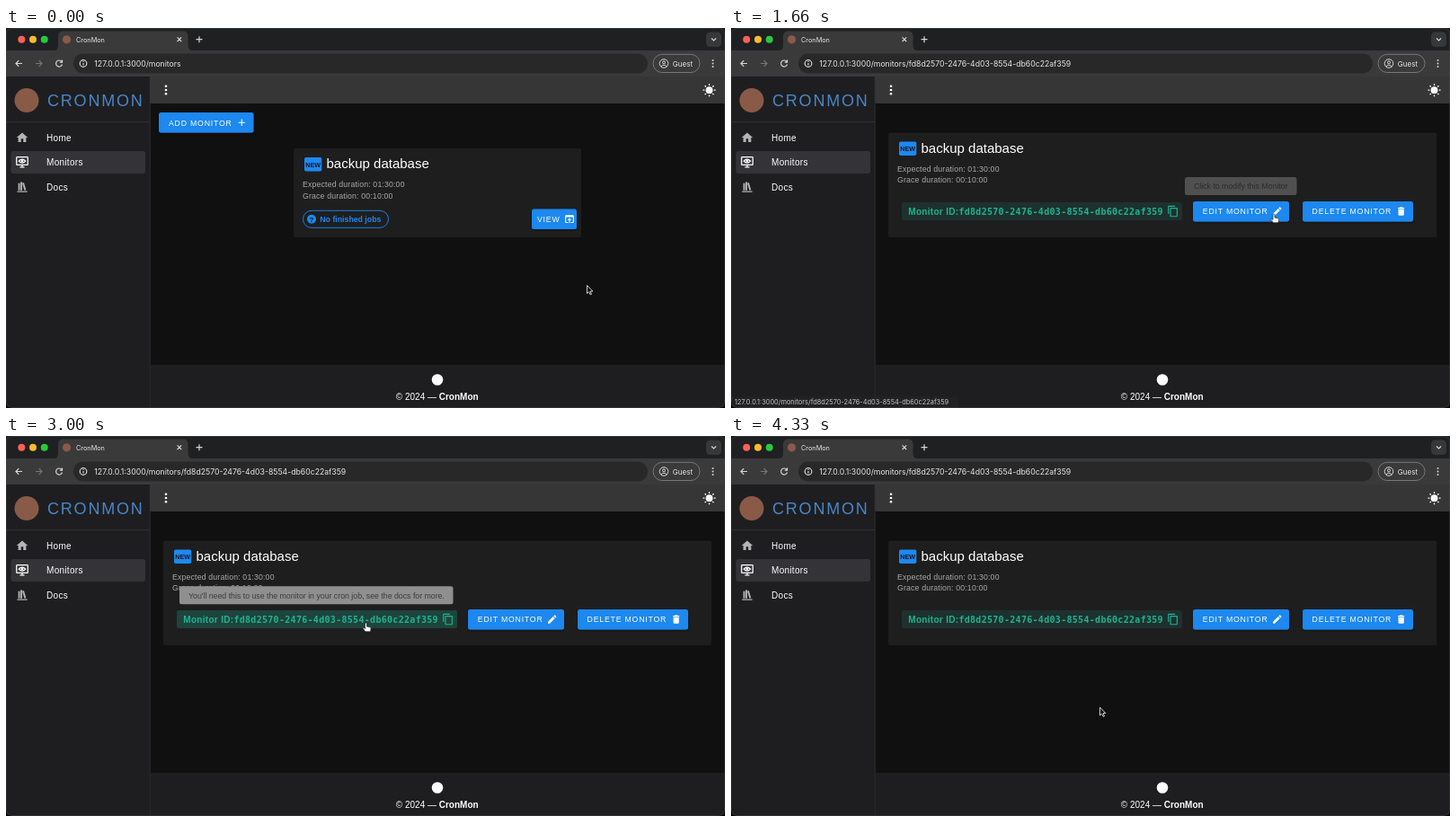
Write an HTML page that moves like this. It is 800 px wide and 423 px high and loops after 4.41 s.

```html
<!DOCTYPE html>
<html lang="en">
<head>
<meta charset="utf-8">
<title>CronMon</title>
<style>
html, body { margin: 0; width: 100%; height: 100%; overflow: hidden; background: #101010; }
svg { display: block; width: 100vw; height: 100vh; }
text { font-family: "Liberation Sans", Arial, sans-serif; fill: #fff; white-space: pre; }
.ui { font-family: Inter, sans-serif; fill: #e6e6e6; }
.nav { font-size: 10px; letter-spacing: .3px; }
.title { font-size: 15px; }
.sub { font-size: 8.75px; letter-spacing: .156px; fill: #a9a9a9; }
.btn { font-size: 8.75px; letter-spacing: .78px; }
.tip { font-size: 8.75px; fill: #3c3c3c; }
.id { font-size: 10px; font-weight: bold; letter-spacing: .3px; fill: #1fb394; }
.mono { font-family: "DejaVu Sans Mono", monospace; }
.line { fill: none; stroke: #d6d6d6; stroke-width: 1.2; }
.blue { fill: #1e88f0; }
.white { fill: #fff; }
</style>
</head>
<body>
<svg viewBox="0 0 800 423" preserveAspectRatio="none">
  <defs>
    <clipPath id="viewClip"><rect x="585" y="201.5" width="50" height="22.5" rx="2.5"/></clipPath>
    <filter id="shade" x="-10%" y="-20%" width="120%" height="160%">
      <feDropShadow dx="0" dy="1" stdDeviation="1" flood-opacity=".5"/>
    </filter>
  </defs>

  <!-- browser frame -->
  <rect width="800" height="423" fill="#101010"/>
  <rect width="800" height="26" fill="#1f2022"/>
  <path d="M52 25.5Q58 25.5 58 19V9Q58 3.5 64 3.5H197Q202.500 3.500 202.500 9V19Q202.500 25.500 208.500 25.500Z" fill="#3a3a3b"/>
  <rect y="25" width="800" height="29" fill="#3a3a3b"/>
  <circle cx="17.300" cy="12.800" r="4" fill="#ff5f57"/>
  <circle cx="30" cy="12.800" r="4" fill="#febc2e"/>
  <circle cx="42.700" cy="12.800" r="4" fill="#28c840"/>
  <circle cx="67.500" cy="12.800" r="4.600" fill="#8a5a48"/>
  <text class="ui" x="78" y="15.500" font-size="7.300">CronMon</text>
  <path class="line" d="M190.600 10.400l4.600 4.600m0-4.600l-4.600 4.600M211.500 12.700h7m-3.500-3.500v7"/>
  <rect x="779" y="4.500" width="17" height="16.500" rx="4.500" fill="#37383a"/>
  <path class="line" d="M785 11.500l2.500 2.500 2.500-2.500"/>
  <path class="line" d="M18 39.500H11m3.300-3.300L11 39.500l3.300 3.300"/>
  <path class="line" style="stroke:#767676" d="M33 39.500h7m-3.300-3.300l3.300 3.300-3.300 3.300"/>
  <path class="line" d="M62 37.500A3.500 3.500 0 1 0 62.500 40.500M62.500 35.500V38.200H59.800"/>
  <rect x="75" y="28.500" width="639" height="22" rx="11" fill="#282829"/>
  <circle class="line" cx="86" cy="39.500" r="3.800" stroke-width="1"/>
  <path class="line" d="M86 38.900v2.700m0-4.500v1"/>
  <text class="ui" id="url" x="98.300" y="42.700" font-size="8.700"></text>
  <rect class="line" x="720" y="29.300" width="52" height="20.200" rx="10.100" style="stroke:#777;stroke-width:1"/>
  <circle class="line" cx="732" cy="39.500" r="4.800" style="stroke-width:1"/>
  <circle class="line" cx="732" cy="38.300" r="1.500" style="stroke-width:1"/>
  <path class="line" d="M728.800 42.800Q732 39.600 735.200 42.800" style="stroke-width:1"/>
  <text class="ui" x="741.800" y="42.500" font-size="8">Guest</text>
  <g fill="#d6d6d6"><circle cx="786.500" cy="36" r="1"/><circle cx="786.500" cy="39.500" r="1"/><circle cx="786.500" cy="43" r="1"/></g>

  <!-- app shell -->
  <rect x="160" y="54" width="640" height="30" fill="#363637"/>
  <rect y="54" width="160" height="369" fill="#1e1e20"/>
  <path d="M160.300 54V423M0 104.500H160" stroke="#353537" stroke-width=".8"/>
  <rect x="161" y="375" width="639" height="48" fill="#1e1e20"/>
  <circle cx="23" cy="80.500" r="13.500" fill="#8a5a48"/>
  <text x="46" y="86.800" font-size="18" style="fill:#4a86c8;letter-spacing:1.8px">CRONMON</text>
  <g class="white"><circle cx="178" cy="64.800" r="1.300"/><circle cx="178" cy="69" r="1.300"/><circle cx="178" cy="73.200" r="1.300"/></g>
  <circle class="white" cx="782.500" cy="69.200" r="3.900"/>
  <path id="rays" stroke="#fff" stroke-width="1.300"/>
  <rect x="5.500" y="137" width="149.500" height="25" rx="2.500" fill="#343337"/>
  <g fill="#b4b4b5">
    <path transform="translate(10.500 114.500) scale(.625)" d="M10,20V14H14V20H19V12H22L12,3L2,12H5V20H10Z"/>
    <path transform="translate(10.500 169.500) scale(.625)" d="M9 3V18H12V3H9M12 5L16 18L19 17L15 4L12 5M5 5V18H8V5H5M3 19V21H21V19H3Z"/>
  </g>
  <g transform="translate(10.500 141.800) scale(.625)" fill="none" stroke="#fff" stroke-width="2">
    <rect x="2" y="3" width="20" height="14" rx="1"/>
    <path d="M12 17v4M8 21h8M6 10Q12 3.500 18 10Q12 16.500 6 10Z"/>
    <circle cx="12" cy="10" r="1.300"/>
  </g>
  <text class="nav" x="45" y="125.700">Home</text>
  <text class="nav" x="45" y="153.200">Monitors</text>
  <text class="nav" x="45" y="180.700">Docs</text>
  <circle class="white" cx="480" cy="391.500" r="6.300"/>
  <text x="433.800" y="413.500" font-size="10">© 2024 — <tspan font-weight="bold">CronMon</tspan></text>

  <!-- monitor list -->
  <g id="list">
    <rect class="blue" x="170" y="94" width="105.500" height="22.500" rx="2.500" filter="url(#shade)"/>
    <text class="btn" x="181" y="108.600">ADD MONITOR</text>
    <path class="white" transform="translate(256 99) scale(.52)" d="M19,13H13V19H11V13H5V11H11V5H13V11H19V13Z"/>
    <rect x="320" y="134" width="320" height="99" rx="2" fill="#1e1e1f"/>
    <rect x="330.500" y="203.300" width="95" height="19" rx="9.500" fill="none" stroke="#1e88f0" stroke-width=".9"/>
    <circle class="blue" cx="340" cy="212.800" r="5"/>
    <text x="340" y="215.700" font-size="8" font-weight="bold" text-anchor="middle" style="fill:#1e1e1f">?</text>
    <text x="349.300" y="216" font-size="8.750" font-weight="bold" style="fill:#1e88f0">No finished jobs</text>
    <rect class="blue" x="585" y="201.500" width="50" height="22.500" rx="2.500" filter="url(#shade)"/>
    <text class="btn" x="591" y="216">VIEW</text>
    <path class="white" transform="translate(620.500 206.200) scale(.54)" d="M12,10L8,14H11V20H13V14H16M19,4H5C3.890,4 3,4.900 3,6V18A2,2 0 0,0 5,20H9V18H5V8H19V18H15V20H19A2,2 0 0,0 21,18V6A2,2 0 0,0 19,4Z"/>
    <g clip-path="url(#viewClip)" class="white">
      <rect id="viewHover" x="585" y="201.500" width="50" height="22.500"/>
      <circle id="ripple" cx="604" cy="209" opacity=".16"/>
    </g>
  </g>

  <!-- monitor detail -->
  <g id="detail">
    <rect x="175" y="116.500" width="610" height="116.500" rx="2" fill="#1e1e1f"/>
    <rect id="chip" x="190" y="194" width="312" height="20" rx="2.500"/>
    <text class="id" x="197.300" y="207.700">Monitor ID:<tspan class="mono" id="uuid"></tspan></text>
    <path transform="translate(485 197.200) scale(.57)" fill="#1fb394" d="M19,21H8V7H19M19,5H8A2,2 0 0,0 6,7V21A2,2 0 0,0 8,23H19A2,2 0 0,0 21,21V7A2,2 0 0,0 19,5M16,1H4A2,2 0 0,0 2,3V17H4V3H16V1Z"/>
    <rect class="blue" x="514" y="193" width="107" height="22.500" rx="2.500" filter="url(#shade)"/>
    <text class="btn" x="524.800" y="207.400">EDIT MONITOR</text>
    <path class="white" transform="translate(601.500 197.800) scale(.52)" d="M20.710,7.040C21.100,6.650 21.100,6 20.710,5.630L18.370,3.290C18,2.900 17.350,2.900 16.960,3.290L15.120,5.120L18.870,8.870M3,17.250V21H6.750L17.810,9.930L14.060,6.180L3,17.250Z"/>
    <rect class="blue" x="636" y="193" width="123" height="22.500" rx="2.500" filter="url(#shade)"/>
    <text class="btn" x="646.600" y="207.400">DELETE MONITOR</text>
    <path class="white" transform="translate(739.400 197.800) scale(.52)" d="M19,4H15.500L14.500,3H9.500L8.500,4H5V6H19M6,19A2,2 0 0,0 8,21H16A2,2 0 0,0 18,19V7H6V19Z"/>
  </g>

  <g id="head">
    <rect class="blue" x="332" y="144" width="19.300" height="15.500" rx="1.800"/>
    <text x="341.600" y="154.500" font-size="7.200" font-weight="bold" text-anchor="middle" style="fill:#16181c">NEW</text>
    <text class="title" x="356.500" y="156">backup database</text>
    <text class="sub" x="330" y="177">Expected duration: 01:30:00</text>
    <text class="sub" x="330" y="189.500">Grace duration: 00:10:00</text>
  </g>

  <g id="editTip">
    <rect x="505" y="166" width="124.500" height="20" rx="2.500" fill="#8f8f8f"/>
    <text class="tip" x="515" y="179.200">Click to modify this Monitor</text>
  </g>
  <g id="idTip">
    <rect x="193" y="167.300" width="304.500" height="20" rx="2.500" fill="#8f8f8f"/>
    <text class="tip" x="203" y="180.500">You'll need this to use the monitor in your cron job, see the docs for more.</text>
  </g>

  <g id="status">
    <path d="M0 410H250Q253 410 253 413V423H0Z" fill="#212123"/>
    <text class="ui" id="link" x="4" y="418.600" font-size="7.400" style="fill:#c4c4c4"></text>
  </g>
  <rect x=".5" y=".5" width="799" height="422" rx="6" fill="none" stroke="#4a4a4a" stroke-opacity=".6" stroke-width=".8"/>
  <path d="M0 416V423H7Q0 423 0 416ZM800 416V423H793Q800 423 800 416Z" fill="#060606"/>

  <g id="pointer">
    <path id="arrow" d="M0 0V9L2.100 7.100L3.600 10.400L5 9.800L3.500 6.600H6.300Z" fill="#000" stroke="#fff" stroke-width=".8"/>
    <path id="hand" d="M-1 1Q-1 0 0 0Q1 0 1 1V4L4.600 4.800Q5.800 5.200 5.600 6.400L5 9.800H-.6L-3.200 6.400Q-3.400 5.300 -2.400 5.400L-1 6.400Z" fill="#fff" stroke="#222" stroke-width=".7"/>
  </g>
</svg>
<script>
const LOOP = 4410, STEP = 1000 / 12, OPEN = 1580;
const ID = 'fd8d2570-2476-4d03-8554-db60c22af359';
const BASE = '127.0.0.1:3000/monitors';
const el = id => document.getElementById(id);
const set = (id, attrs) => { for (const k in attrs) el(id).setAttribute(k, attrs[k]); };
const show = (id, on) => set(id, { opacity: Number(on) });
const ramp = (t, a, b) => Math.min(1, Math.max(0, (t - a) / (b - a)));
const ease = u => u * u * (3 - 2 * u);
const mix = (a, b, u) => a + (b - a) * u;
const fade = (t, a, b, c, d) => ramp(t, a, b) * (1 - ramp(t, c, d));

// pointer trips: start, end, target
const START = [646.5, 286.5];
const TRIPS = [
  [420, 1000, [604, 207]],
  [1680, 2200, [400.5, 208]],
  [3250, 3700, [410.5, 302]]
];

function pointerAt(t) {
  let p = START;
  for (const [a, b, to] of TRIPS) {
    const u = ease(ramp(t, a, b));
    p = [mix(p[0], to[0], u), mix(p[1], to[1], u)];
  }
  return p;
}

const inside = ([x, y], l, top, r, bottom) => x >= l && x <= r && y >= top && y <= bottom;

function draw(t) {
  const open = t >= OPEN;
  const p = pointerAt(t);
  const onView = !open && inside(p, 585, 201, 635, 224);
  const onEdit = open && inside(p, 514, 193, 621, 215.5);
  const onChip = open && inside(p, 190, 194, 502, 214);
  const hand = onView || onEdit || onChip;

  show('list', !open);
  show('detail', open);
  set('head', { transform: open ? 'translate(-145 -17.5)' : '' });
  el('url').textContent = open ? BASE + '/' + ID : BASE;

  show('viewHover', onView ? .08 : 0);
  set('ripple', { r: 36 * ramp(t, 1200, 1340) });

  const glow = onChip ? mix(.17, .25, ramp(t, 2660, 2900)) : .13;
  set('chip', { fill: '#1fb394', 'fill-opacity': glow });

  show('editTip', fade(t, 1600, 1750, 2010, 2130));
  show('idTip', fade(t, 2080, 2230, 3380, 3500));
  show('status', open ? 1 - ramp(t, 1900, 2090) : onView);

  set('pointer', { transform: `translate(${p[0]} ${p[1]})` });
  show('hand', hand);
  show('arrow', !hand);
}

el('uuid').textContent = ID;
el('link').textContent = BASE + '/' + ID;
let rays = '';
for (let i = 0; i < 8; i++) {
  const c = Math.cos(i * Math.PI / 4), s = Math.sin(i * Math.PI / 4);
  rays += `M${782.5 + 5.2 * c} ${69.2 + 5.2 * s}L${782.5 + 7 * c} ${69.2 + 7 * s}`;
}
set('rays', { d: rays });

const began = performance.now();
function tick() {
  const t = (performance.now() - began) % LOOP;
  draw(Math.floor((t + 7) / STEP) * STEP);
  requestAnimationFrame(tick);
}
tick();
</script>
</body>
</html>
```
